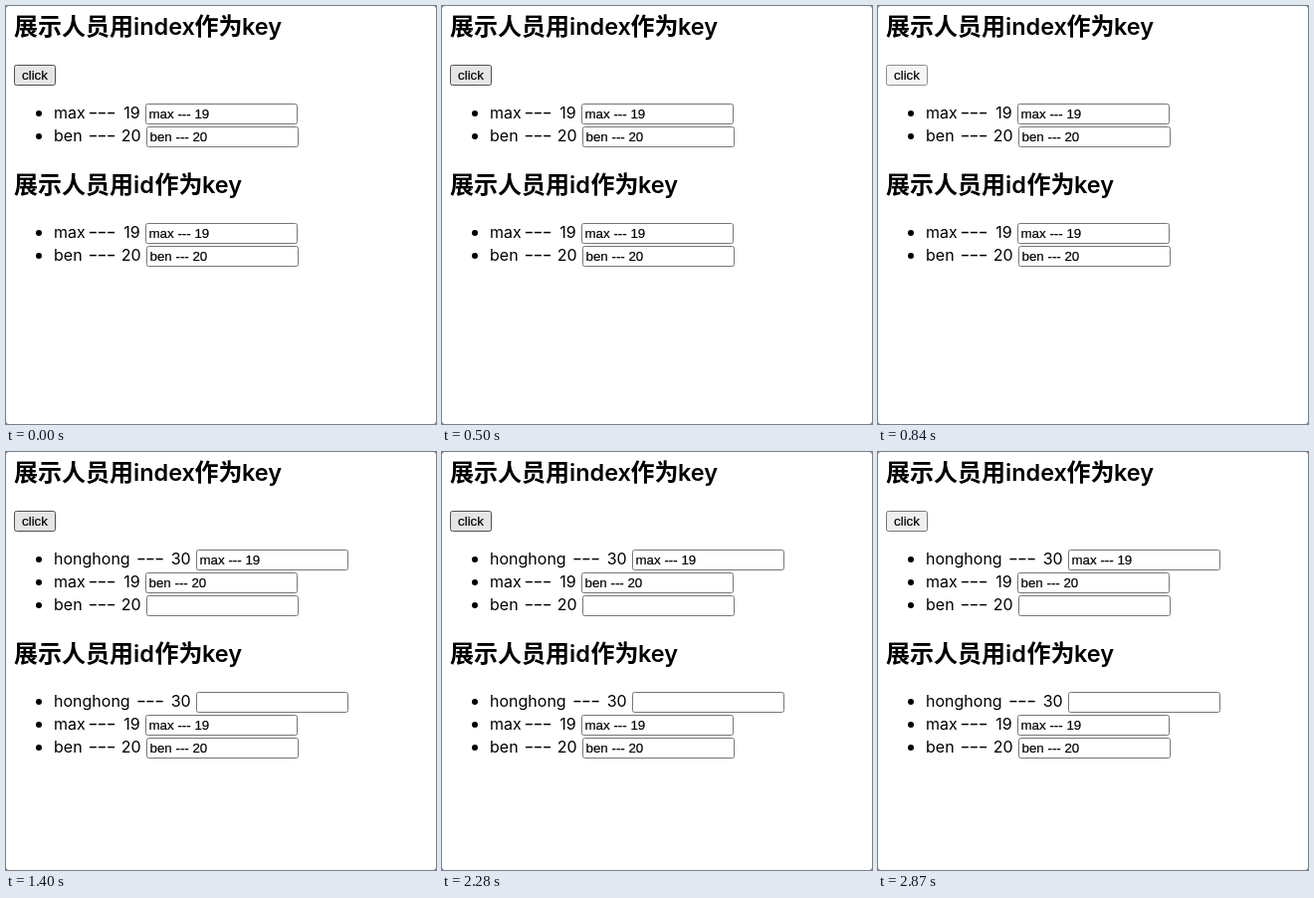
An HTML page that plays this animation: 432x420 px, repeating every 2940 ms.

```html
<!DOCTYPE html>
<html lang="zh-CN">
<head>
<meta charset="utf-8">
<style>
  html, body { margin: 0; width: 100%; height: 100%; overflow: hidden; background: #777; }
  svg { display: block; }
  text { fill: #000; white-space: pre; }
  .han { font: 700 24px "Noto Sans CJK SC", "Noto Sans CJK", sans-serif; }
  .head { font: 600 23.5px Inter, sans-serif; }
  .item { font: 400 16px Inter, sans-serif; }
  .dash { font: 700 14px "Liberation Sans", Arial, sans-serif; letter-spacing: 1.3px; }
  .form { font: 400 13.333px "Liberation Sans", Arial, sans-serif; stroke: #000; stroke-width: .2; }
</style>
</head>
<body>
<svg id="stage" width="432" height="420" viewBox="0 0 432 420"></svg>
<script>
const stage = document.getElementById('stage');
const LOOP = 2940;

// dash: left edge of the dashes, box: left edge of the input
const max = { name: 'max', age: 19, dash: 83.5, box: 140 };
const ben = { name: 'ben', age: 20, dash: 83.5, box: 141 };
const hong = { name: 'honghong', age: 30, dash: 132, box: 191 };
const before = [max, ben];
const after = [hong, max, ben];

const buttonStyle = {
  hover: ['#e5e5e5', '#4f4f4f'],
  active: ['#f5f5f5', '#8d8d8d'],
  normal: ['#efefef', '#767676']
};

const text = (cls, x, y, s, more = '') =>
  `<text class="${cls}" x="${x}" y="${y}" ${more}>${s}</text>`;

const box = (x, y, w, h, r, fill, stroke) =>
  `<rect x="${x + .5}" y="${y + .5}" width="${w - 1}" height="${h - 1}" rx="${r}" fill="${fill}" stroke="${stroke}"/>`;

// y is the baseline; width is the room taken by the latin word
const heading = (y, word, width) =>
  text('han', 8, y, '展示人员用') + text('head', 128, y, word) +
  text('han', 128 + width, y, '作为') + text('head', 175.5 + width, y, 'key');

const row = (p, value, y) =>
  `<circle cx="33" cy="${y + 10}" r="3"/>` +
  text('item', 48, y + 15, p.name) +
  text('dash', p.dash, y + 14, '–––') +
  text('item', p.box - 5.3, y + 15, p.age, 'text-anchor="end"') +
  box(p.box, y, 153, 21, 2, '#fff', '#767676') +
  (value ? text('form', p.box + 3.5, y + 15, `${value.name} --- ${value.age}`) : '');

const list = (people, values, y) =>
  people.map((p, i) => row(p, values[i], y + 23 * i)).join('');

function draw(state, added) {
  const people = added ? after : before;
  const shift = added ? 23 : 0;
  stage.innerHTML =
    '<rect width="432" height="420" rx="3" fill="#fff"/>' +
    heading(29, 'index', 61.5) +
    box(8, 59, 42, 21, 2, ...buttonStyle[state]) +
    text('form', 16, 74, 'click') +
    list(people, before, 98) +
    heading(188 + shift, 'id', 21.5) +
    list(people, added ? [null, max, ben] : before, 218 + shift);
}

let shown = '';
function tick() {
  const t = performance.now() % LOOP;
  const state = t < 840 ? 'hover' : t < 1400 ? 'active' : t < 2870 ? 'hover' : 'normal';
  const added = t >= 1400;
  if (shown !== state + added) {
    shown = state + added;
    draw(state, added);
  }
  requestAnimationFrame(tick);
}
tick();
</script>
</body>
</html>
```
